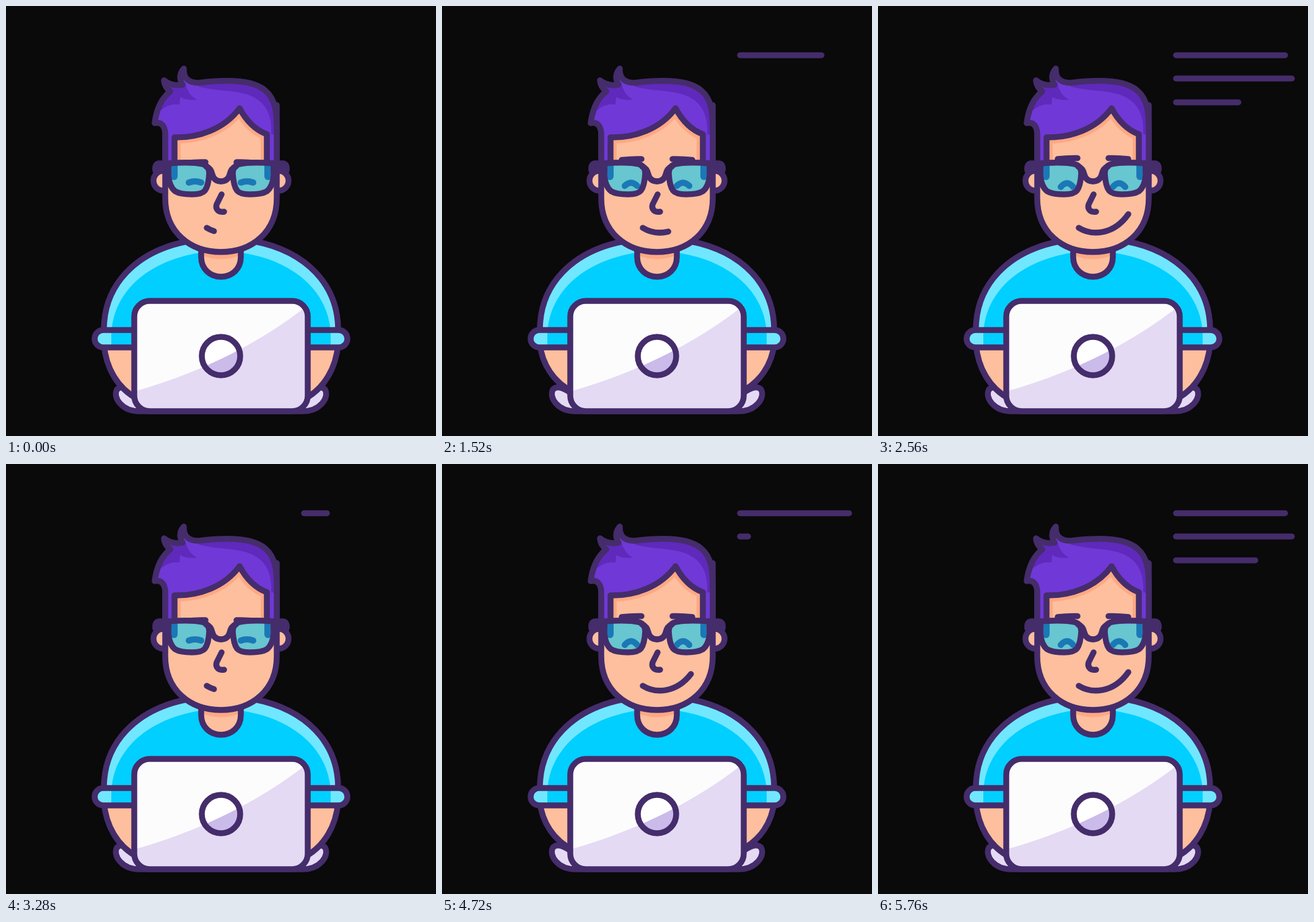
An HTML page that plays this animation: 694 px wide and 694 px high, repeating every 6 s.

```html
<!DOCTYPE html>
<html lang="en">
<head>
<meta charset="utf-8">
<title>Typing</title>
<style>
html, body { margin: 0; width: 100%; height: 100%; overflow: hidden; background: #0a0a0a; }
svg { display: block; width: 100vw; height: 100vh; }
.o { stroke: #452c6b; stroke-width: 9.5; stroke-linecap: round; stroke-linejoin: round; }
.n { fill: none; }
.skin { fill: #fdbf9d; }
.shade { fill: #ffa883; }
.pale { fill: #e4daf4; }
.light { fill: #70e7ff; }
.cyan { fill: #00cfff; }
.lens { stroke: #1b78b6; stroke-width: 10; stroke-linecap: round; fill: none; }
</style>
</head>
<body>
<svg viewBox="0 0 694 694">
  <defs>
    <path id="rim" d="M262 254Q298 251 317 255Q328 258 328 270Q327 290 321 298Q316 304 300 304Q281 304 273 299Q264 292 262 274Z"/>
    <path id="sheen" d="M207 622C322 590 418 538 487 483V629A25 25 0 0 1 462 654H232A25 25 0 0 1 207 629Z"/>
    <clipPath id="lensClip"><use href="#rim"/></clipPath>
    <clipPath id="headClip"><path d="M257 150H437V310C437 365 397 397 347 397S257 365 257 310Z"/></clipPath>
    <clipPath id="logoClip"><circle cx="347" cy="565" r="31"/></clipPath>
  </defs>

  <g id="lines" class="o n">
    <path id="cursor" d="M481 79.5H518"/>
    <path/><path/><path/>
  </g>

  <!-- keyboard base and arms -->
  <path class="o pale" d="M207 624Q187 610 179 619C172 632 187 654 215 654H479C507 654 522 632 515 619Q507 610 487 624Z"/>
  <path id="arm" class="o skin"/>
  <use href="#arm" transform="matrix(-1 0 0 1 694 0)"/>

  <!-- shirt -->
  <path class="light" d="M158 530C157 449 211 396 292 380H402C483 396 537 449 536 530Z"/>
  <path class="cyan" d="M170 530C172 463 227 411 315 398H379C467 411 522 463 524 530Z"/>
  <path class="o n" d="M158 525C157 449 211 396 292 380M536 525C537 449 483 396 402 380"/>
  <g id="cuff">
    <path class="light" d="M215 523H157A14 14 0 0 0 157 551H215Z"/>
    <path class="cyan" d="M170 523H215V551H170Z"/>
    <path class="o n" d="M215 523H157A14 14 0 0 0 157 551H215"/>
  </g>
  <use href="#cuff" transform="matrix(-1 0 0 1 694 0)"/>
  <path class="skin" d="M315 390V405C315 425 330 437 347 437S379 425 379 405V390Z"/>
  <path class="shade" d="M315 390V402Q347 415 379 402V390Z"/>
  <path class="o n" d="M315 392V405C315 425 330 437 347 437S379 425 379 405V392"/>

  <!-- head -->
  <circle id="ear" class="o skin" cx="254" cy="282" r="16"/>
  <use href="#ear" transform="matrix(-1 0 0 1 694 0)"/>
  <path class="o skin" d="M257 160V310C257 365 297 397 347 397S437 365 437 310V160"/>
  <path class="n" clip-path="url(#headClip)" stroke="#ffa883" stroke-width="20" d="M272 255V212C310 213 352 199 377 165C387 184 400 199 421 207V255"/>
  <path id="hair" fill="#7038d6" d="M257 262V205Q255 186 240 189C243 165 252 148 265 138Q256 131 255 120Q267 130 285 127C279 117 280 109 287 101C286 117 295 124 311 124C350 119 396 117 418 136C436 151 437 174 437 200V262H421V207C400 199 387 184 377 165C352 199 310 213 272 212V262Z"/>
  <path fill="#5f29bb" d="M265 138L255 120L285 127L289 124Q294 144 308 151Q292 153 281 147L280 159Q262 156 246 172Q252 149 265 138ZM311 124C350 119 396 117 418 136C436 151 437 174 437 208L428 207C430 170 415 152 390 143C365 135 340 138 311 130Z"/>
  <use href="#hair" class="o" style="fill-opacity:0"/>

  <g class="o n">
    <g id="brows"><path id="brow" d="M290 247Q306 245 322 245.5"/><use href="#brow" transform="matrix(-1 0 0 1 694 0)"/></g>
    <path d="M348 304Q344 312 340 320Q338 326 342 330Q346 333 352 332"/>
    <path id="smile" pathLength="100" d="M324 358C345 371 380 370 404 336"/>
  </g>

  <!-- glasses -->
  <g id="glass">
    <g clip-path="url(#lensClip)">
      <path fill="#67c6cf" d="M255 245H335V310H255Z"/>
      <path class="lens" d="M271 250V275" style="stroke-width:12"/>
      <path class="lens eye"/>
    </g>
    <use href="#rim" class="o n"/>
    <path class="o" fill="#452c6b" d="M241 265Q240 255 247 254H262V265Z"/>
    <path class="o n" d="M323 259Q331 262 333 272Q336 283 347 283"/>
  </g>
  <use href="#glass" transform="matrix(-1 0 0 1 694 0)"/>

  <!-- laptop -->
  <rect x="207" y="476" width="280" height="178" rx="25" fill="#fcfcfd"/>
  <use href="#sheen" class="pale"/>
  <circle cx="347" cy="565" r="31" fill="#fff"/>
  <g clip-path="url(#logoClip)"><use href="#sheen" fill="#cabbea"/></g>
  <circle class="o n" cx="347" cy="565" r="31"/>
  <rect class="o n" x="207" y="476" width="280" height="178" rx="25"/>
</svg>
<script>
const $ = id => document.getElementById(id);
const clamp = v => Math.min(1, Math.max(0, v));
const ramp = (t, a, b) => clamp((t - a) / (b - a));
const ease = v => v * v * (3 - 2 * v);
const eye = document.querySelector('.eye');
const rows = [...$('lines').children].slice(1);

// y, first end, last end, start time, stop time
const lines = [
  [79.5, 518, 657, 1240, 1690],
  [117, 488, 668, 1740, 2290],
  [155.5, 488, 609, 2290, 2680]
];

function draw(t) {
  const blink = (a, b) => ramp(t, a, a + 70) * (1 - ramp(t, b - 70, b));
  $('cursor').style.opacity = Math.max(blink(230, 580), blink(830, 1182));

  lines.forEach(([y, x0, x1, start, stop], i) => {
    const x = x0 + (x1 - x0) * ease(ramp(t, start, stop));
    rows[i].setAttribute('d', t < start ? '' : `M481 ${y}H${x}`);
  });

  const tap = clamp(0.5 + 0.9 * Math.cos((t - 1860) / 280 * 2 * Math.PI));
  const lift = tap * ramp(t, 1240, 1300) * (1 - ramp(t, 2760, 2840));
  $('arm').setAttribute('d',
    `M158 545C161 ${584 - 10 * lift} 180 ${617 - 13 * lift} 212 ${634 - 16 * lift}V545Z`);

  const grin = ease(ramp(t, 1260, 1880));
  $('smile').style.strokeDasharray = `${14 + 86 * grin} 200`;

  const joy = ease(ramp(t, 1260, 1640));
  $('brows').setAttribute('transform', `translate(0 ${6.5 * (1 - joy)})`);
  eye.setAttribute('d', `M295 ${285 + 7 * joy}Q305 ${281 - joy} 315 ${285 + 7 * joy}`);
}

function tick(now) {
  const t = Math.min(5760, Math.floor(now % 6000 / 80) * 80);
  draw(t < 2960 ? t : t - 2920);
  requestAnimationFrame(tick);
}
draw(0);
requestAnimationFrame(tick);
</script>
</body>
</html>
```
